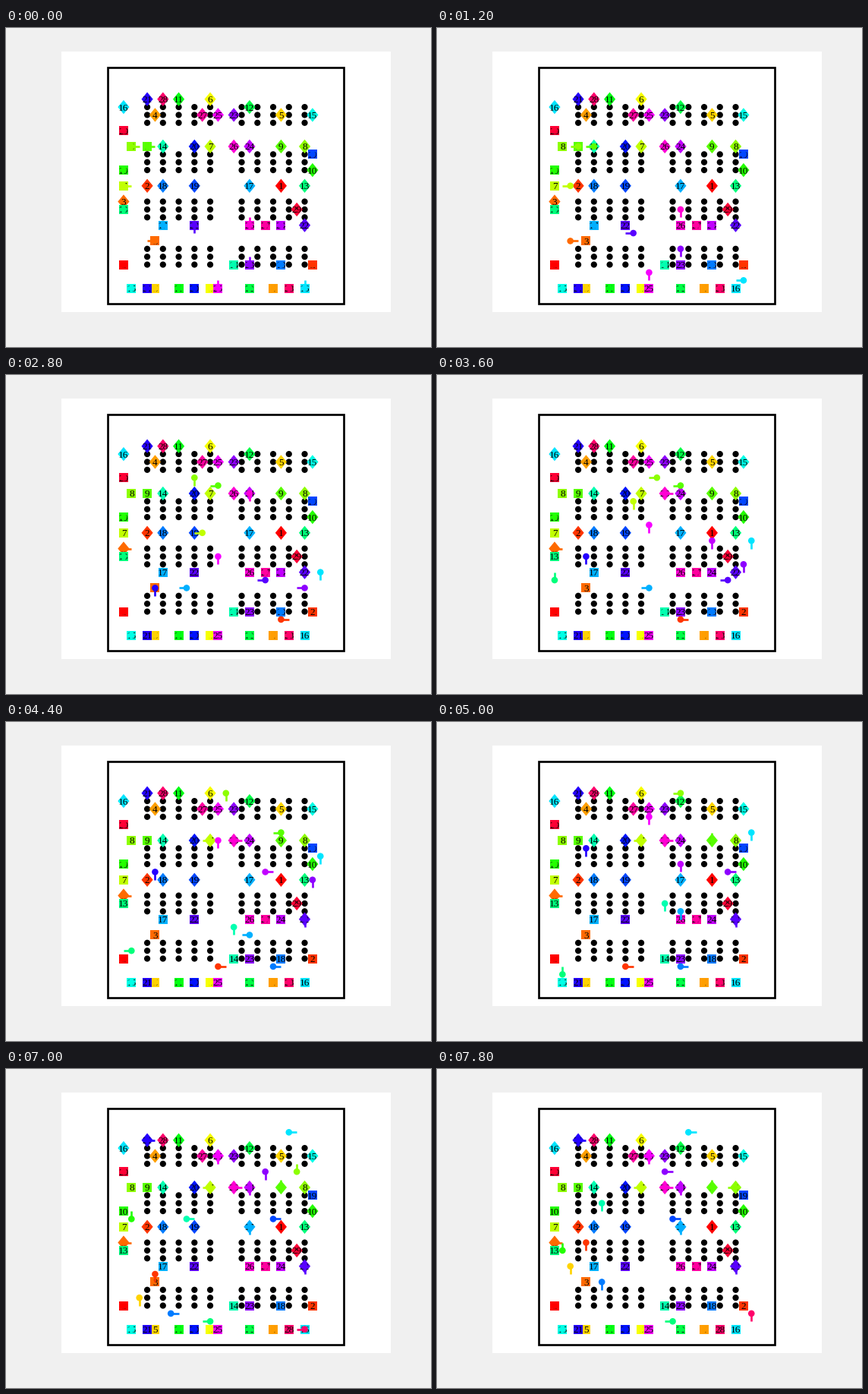
A matplotlib script that plays this animation: 560 px wide and 420 px high, repeating every 8000 ms.

```python
import colorsys

import matplotlib.pyplot as plt
from matplotlib.animation import FuncAnimation
from matplotlib.patches import Circle, Polygon, Rectangle

W, H, DPI = 560, 420, 100
CELL = 342.3 / 33
PX = 72 / DPI                     # points per pixel
STEP_MS, HOLD, STEPS = 200, 5, 35

# start column, start row, goal column, goal row; agents 1 to 29
AGENTS = [
    (2, 5, 22, 15), (26, 5, 5, 15), (6, 8, 2, 13), (21, 2, 6, 24),
    (6, 2, 22, 24), (13, 2, 13, 26), (2, 15, 13, 20), (3, 20, 25, 20),
    (5, 20, 22, 20), (2, 17, 26, 17), (9, 2, 9, 26), (18, 2, 18, 25),
    (2, 12, 25, 15), (16, 5, 7, 20), (3, 2, 26, 24), (25, 2, 2, 25),
    (7, 10, 18, 15), (22, 5, 7, 15), (26, 19, 11, 15), (11, 2, 11, 20),
    (5, 2, 5, 26), (11, 10, 25, 10), (18, 5, 16, 24), (22, 10, 18, 20),
    (14, 2, 14, 24), (18, 10, 16, 20), (20, 10, 12, 24), (23, 2, 7, 26),
    (2, 22, 24, 12),
]

# agent: (steps waited before leaving, moves)
TRIPS = {
    2: (5, "D1 L20 U9"),
    3: (0, "L3 U5 L1"),
    5: (25, "U2 L2 U6"),
    7: (0, "R10 U5 R1"),
    8: (0, "R8 U2 R4 U4 R9 D6 R1"),
    9: (0, "R6 U1 R11 D1"),
    10: (29, "R1 D5"),
    13: (11, "D6 R1 D3 R14"),
    14: (14, "U11 L8 U2"),
    16: (0, "U1 R2 U24 L8"),
    17: (5, "D2 R11 U7"),
    18: (16, "D1 L14 U4"),
    19: (23, "D3 L9"),
    21: (3, "U2 R1 U22 L1"),
    22: (0, "D1 R14 U1"),
    23: (0, "U3 R8 U8 L6 U6 L4"),
    24: (10, "U6 L4 U4"),
    25: (0, "U22"),
    26: (0, "U10 L2"),
    28: (29, "R4 U2"),
}
DIRS = {"R": (1, 0), "L": (-1, 0), "U": (0, 1), "D": (0, -1)}


def to_px(col, row):
    return 289.8 + (col - 15) * CELL, 363.4 - row * CELL


def color(n):
    return colorsys.hsv_to_rgb((n - 1) / len(AGENTS), 1, 1)


def walk(start, moves):
    cells = [start]
    for move in moves.split():
        dx, dy = DIRS[move[0]]
        for _ in range(int(move[1:])):
            x, y = cells[-1]
            cells.append((x + dx, y + dy))
    return cells


fig = plt.figure(figsize=(W / DPI, H / DPI), dpi=DPI, facecolor="#f0f0f0")
ax = fig.add_axes([0, 0, 1, 1])
ax.set_xlim(0, W)
ax.set_ylim(H, 0)
ax.axis("off")


def label(n, x, y):
    ax.text(x, y, str(n), family="Liberation Serif", size=13.33 * PX,
            ha="center", va="center_baseline", zorder=4)


def draw_floor():
    ax.add_patch(Rectangle((73, 31), 434, 343, fc="white", lw=0, zorder=0))
    x, y = to_px(0, 30)
    ax.add_patch(Rectangle((x, y), 30 * CELL, 30 * CELL, fill=False,
                           ec="black", lw=2.67 * PX, zorder=1))
    for col in (5, 7, 9, 11, 13, 17, 19, 21, 23, 25):
        for base in (5, 11, 17, 23):
            for row in range(base, base + 3):
                ax.add_patch(Circle(to_px(col, row), 4.1, fc="black", lw=0, zorder=2))


def draw_stations():
    for n, (sc, sr, gc, gr) in enumerate(AGENTS, 1):
        x, y = to_px(sc, sr)
        ax.add_patch(Rectangle((x - 6, y - 6), 12, 12, fc=color(n), lw=0, zorder=3))
        label(n, x, y)
        x, y = to_px(gc, gr)
        ax.add_patch(Polygon([(x - 7.6, y), (x, y - 9.2), (x + 7.6, y), (x, y + 9.2)],
                             fc=color(n), lw=0, zorder=3))
        label(n, x, y)


class Robot:
    def __init__(self, n, start):
        self.wait, moves = TRIPS.get(n, (STEPS, ""))
        self.cells = walk(start, moves)
        self.body = ax.add_patch(Circle(to_px(*start), 4.3, fc=color(n), lw=0, zorder=5))
        self.tail, = ax.plot([], [], color=color(n), lw=2.67 * PX,
                             solid_capstyle="butt", zorder=5)

    def place(self, step):
        i = min(max(step - self.wait, 0), len(self.cells) - 1)
        self.body.center = to_px(*self.cells[i])
        # before departure the line points ahead, afterwards it trails
        if i > 0:
            ends = self.cells[i - 1:i + 1]
        elif self.wait == 0:
            ends = self.cells[:2]
        else:
            ends = []
        pts = [to_px(*c) for c in ends]
        self.tail.set_data([p[0] for p in pts], [p[1] for p in pts])


draw_floor()
draw_stations()
robots = [Robot(n, a[:2]) for n, a in enumerate(AGENTS, 1)]


def update(i):
    step = max(0, i - HOLD + 1)
    for r in robots:
        r.place(step)
    return [part for r in robots for part in (r.body, r.tail)]


anim = FuncAnimation(fig, update, frames=HOLD + STEPS, interval=STEP_MS,
                     init_func=lambda: update(0), repeat=True, repeat_delay=0)
plt.show()
```
